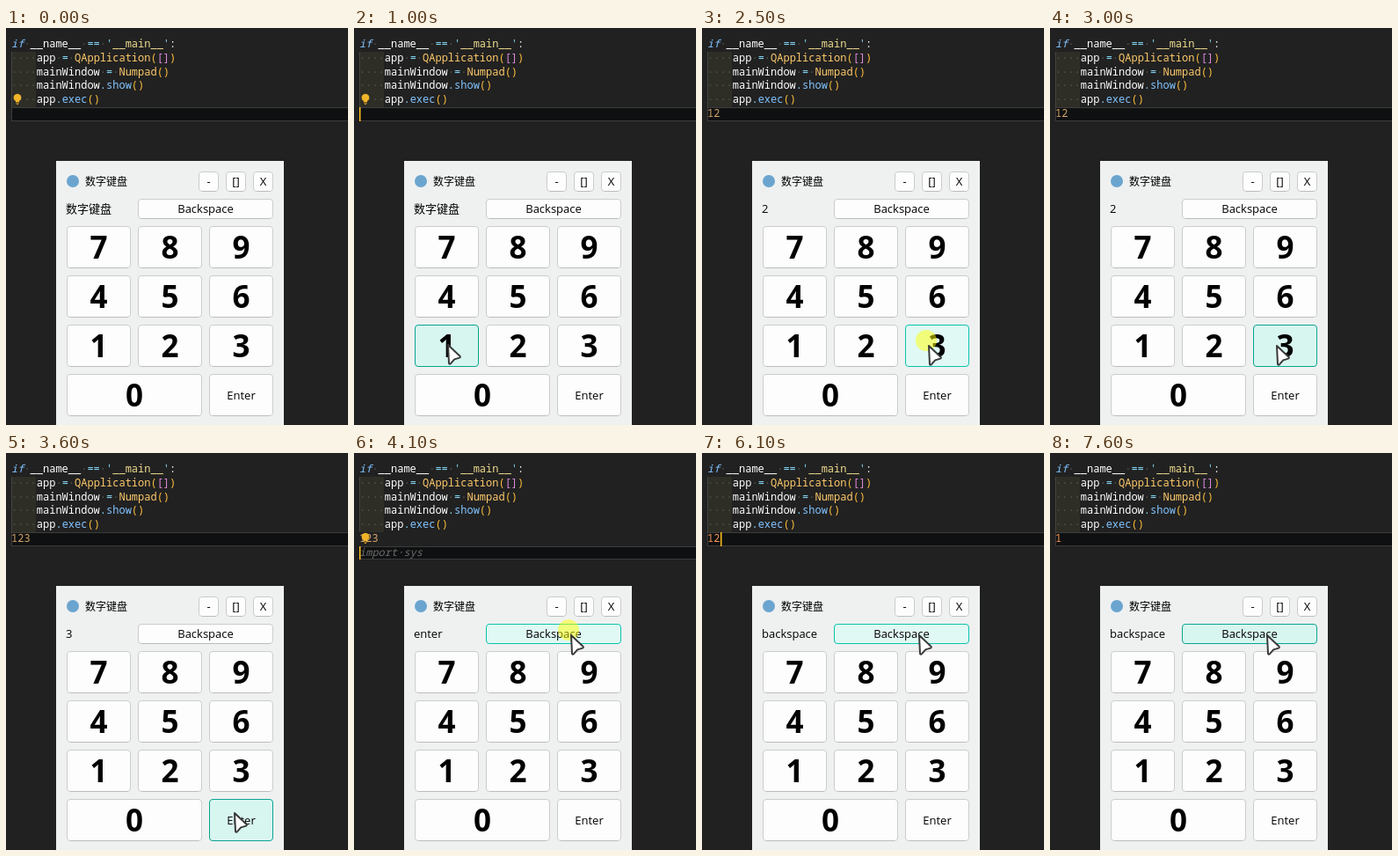
An HTML page for the animation above (8100 ms loop, 389 by 451 pixels).

```html
<!DOCTYPE html>
<html lang="zh">
<head>
<meta charset="utf-8">
<title>Numpad</title>
<style>
html, body { margin: 0; width: 100%; height: 100%; overflow: hidden; background: #212121; }
svg { display: block; width: 389px; height: 451px; }
text { white-space: pre; }
.code { font: 500 12px "Noto Sans Mono", monospace; }
.ghost { font-style: italic; fill: #6c6c6c; }
.ui { font: 500 13px "Open Sans", "Noto Sans CJK SC", "Noto Sans CJK", sans-serif; fill: #000; }
.title { font-size: 12px; }
.mid { text-anchor: middle; }
.digit { font-size: 35px; font-weight: 700; }
.key rect { fill: #fdfdfd; stroke: #cbcccc; }
.key.hover rect { fill: #e0f9f4; stroke: #08c4ac; }
.key.down rect { fill: #d8f6f0; stroke: #08a590; }
.hover path, .down path { display: none; }
</style>
</head>
<body>
<svg id="stage" viewBox="0 0 389 451"></svg>
<script>
const LOOP = 8100;
const stage = document.getElementById('stage');

function add(tag, attrs, text, parent = stage) {
  const el = document.createElementNS('http://www.w3.org/2000/svg', tag);
  for (const k in attrs) el.setAttribute(k, attrs[k]);
  if (text !== undefined) el.textContent = text;
  parent.appendChild(el);
  return el;
}
const show = (el, on) => el.setAttribute('visibility', on ? 'visible' : 'hidden');
const move = (el, x, y) => el.setAttribute('transform', `translate(${x} ${y})`);
const lineTop = n => Math.round(89.8 + (n - 6) * 15.75);
const lineHeight = n => lineTop(n + 1) - lineTop(n);
const baseline = n => lineTop(n) + 11;

// Editor
const WHITE = '#ffffff', BLUE = '#82c4ff', CYAN = '#89ddff', YELLOW = '#ffcb6b',
      GOLD = '#ffbf3c', PINK = '#e08be0', DIM = '#585854';

const rowMark = add('rect', { x: 6.5, y: 0.5, width: 390, fill: '#0f1011', stroke: '#3c3c3c' });
add('rect', { x: 6, y: 27, width: 28, height: 63, fill: '#2e2e27' });
add('rect', { x: 6, y: 27, width: 1, height: 63, fill: '#45453f' });

const source = [
  [['if', BLUE, 'italic'], [' '], ['__name__', WHITE], [' '], ['==', CYAN], [' '],
   ["'", CYAN], ['__main__', '#f0dc90'], ["'", CYAN], [':', WHITE]],
  [['    '], ['app', WHITE], [' '], ['=', CYAN], [' '], ['QApplication', YELLOW],
   ['(', GOLD], ['[]', PINK], [')', GOLD]],
  [['    '], ['mainWindow', WHITE], [' '], ['=', CYAN], [' '], ['Numpad', YELLOW], ['()', GOLD]],
  [['    '], ['mainWindow', WHITE], ['.', CYAN], ['show', BLUE], ['()', GOLD]],
  [['    '], ['app', WHITE], ['.', CYAN], ['exec', BLUE], ['()', GOLD]]
];
source.forEach((tokens, i) => {
  const row = add('text', { class: 'code', x: 6, y: baseline(i + 1) });
  for (const [text, fill = DIM, style = 'normal'] of tokens)
    add('tspan', { fill, 'font-style': style }, text.replace(/ /g, '·'), row);
});

const typed = add('text', { class: 'code', x: 6, y: baseline(6) }, '');
const ghost = add('text', { class: 'code ghost', x: 6, y: baseline(7) }, '');
const caret = add('rect', { width: 1.5, fill: '#ffc21a' });
const bulb = add('g', {});
add('path', { d: 'M-2 3A4.4 4.4 0 1 1 2 3V4H-2Z', fill: '#f0b429' }, undefined, bulb);
add('path', { d: 'M-2 5H2M-1 6.5H1', stroke: '#cf9a24' }, undefined, bulb);

// Keypad window
add('rect', { x: 57, y: 151, width: 259, height: 300, fill: '#eff1f1' });
add('circle', { cx: 76, cy: 174, r: 7, fill: '#6ba5cf' });
add('text', { class: 'ui title', x: 90, y: 179 }, '数字键盘');
const label = add('text', { class: 'ui', x: 68, y: 210 }, '');

const keys = {};
function addKey(name, x, y, w, h, digit) {
  const g = keys[name] = add('g', { class: 'key' });
  add('rect', { x: x + 0.5, y: y + 0.5, width: w - 1, height: h - 1, rx: 3.5 }, undefined, g);
  add('path', { d: `M${x + 4} ${y + h - 0.5}h${w - 8}`, stroke: '#000', 'stroke-opacity': 0.08 }, undefined, g);
  add('text', {
    class: 'ui mid' + (digit ? ' digit' : ''), x: x + w / 2, y: y + h / 2 + (digit ? 13 : 4.5)
  }, name, g);
}
['-', '[]', 'X'].forEach((name, i) => addKey(name, 219 + 31 * i, 163, 23, 23));
addKey('Backspace', 150, 194, 154, 23);
for (let n = 1; n <= 9; n++)
  addKey(String(n), 69 + 81 * ((n - 1) % 3), 337 - 56 * Math.floor((n - 1) / 3), 73, 48, true);
addKey('0', 69, 393, 154, 48, true);
addKey('Enter', 231, 393, 73, 48);

const halo = add('circle', { r: 12, fill: '#ffff00', 'fill-opacity': 0.5 });
const pointer = add('path', {
  d: 'M0 0L1 20.8Q1.6 22.4 3 21.2L7.2 16.4 13 14.6Q14.6 13.8 13.2 12.4Z',
  fill: '#fff', stroke: '#3a3a3a', 'stroke-width': 2, 'stroke-linejoin': 'round'
});

// Pointer tip for each key that gets clicked
const tips = { 1: [107, 360], 2: [188, 360], 3: [258, 361], Enter: [260, 409], Backspace: [247, 207] };

// start, typed text, label, key, pressed, caret, halo
const steps = [
  [0, '', '数字键盘', '', 0, 0, 0],
  [500, '', '数字键盘', '1', 0, 1, 1],
  [1000, '', '数字键盘', '1', 1, 1, 0],
  [1500, '1', '1', '2', 0, 0, 1],
  [2000, '1', '1', '2', 1, 0, 0],
  [2500, '12', '2', '3', 0, 0, 1],
  [3000, '12', '2', '3', 1, 0, 0],
  [3100, '123', '3', 'Enter', 0, 1, 1],
  [3600, '123', '3', 'Enter', 1, 0, 0],
  [4100, '123', 'enter', 'Backspace', 0, 1, 1],
  [4600, '123', 'enter', 'Backspace', 1, 0, 0],
  [5100, '123', 'backspace', 'Backspace', 0, 1, 0],
  [5600, '123', 'backspace', 'Backspace', 1, 0, 0],
  [6100, '12', 'backspace', 'Backspace', 0, 1, 0],
  [6600, '12', 'backspace', 'Backspace', 1, 0, 0],
  [7100, '1', 'backspace', 'Backspace', 0, 1, 0],
  [7600, '1', 'backspace', 'Backspace', 1, 0, 0]
];

function render([start, text, caption, key, pressed, caretOn, haloOn]) {
  const entered = start >= 4100 && start < 5100;
  const row = entered ? 7 : 6;
  const caretX = Math.round(6.4 + (entered ? 0 : text.length * 7.2));

  typed.textContent = text;
  typed.setAttribute('fill', start < 5100 ? '#d3a467' : '#f49355');
  label.textContent = caption;
  rowMark.setAttribute('height', lineHeight(row) - 1);
  caret.setAttribute('height', lineHeight(row));
  move(rowMark, 0, lineTop(row));
  move(caret, caretX, lineTop(row));
  show(caret, caretOn);

  ghost.textContent = entered ? 'import·sys' : 'import sys';
  show(ghost, start >= 4100 && start < 5600);
  move(bulb, 13, entered ? 96 : 80);
  show(bulb, start < 1500 || entered);

  for (const name in keys)
    keys[name].setAttribute('class', 'key' + (name === key ? (pressed ? ' down' : ' hover') : ''));

  show(pointer, key);
  show(halo, haloOn);
  if (key) {
    const [x, y] = tips[key];
    move(pointer, x, y);
    move(halo, x - 3, y - 6);
  }
}

const origin = performance.now();
let current;
function tick() {
  const t = (performance.now() - origin) % LOOP;
  const step = steps.findLast(s => s[0] <= t);
  if (step !== current) render(current = step);
  requestAnimationFrame(tick);
}
tick();
</script>
</body>
</html>
```
